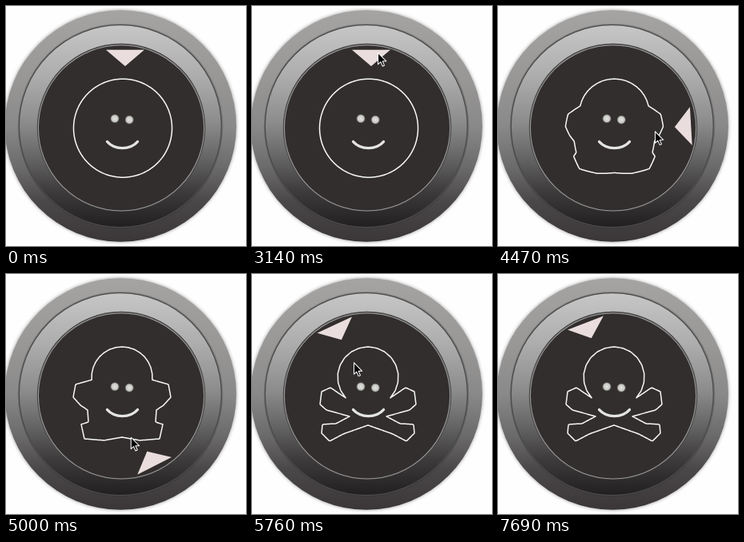
Animation, 300 px wide and 300 px high, one loop 8.35 s. Source, as an HTML page with a canvas:

```html
<!DOCTYPE html>
<html lang="en">
<head>
<meta charset="utf-8">
<title>Morphing dial</title>
<style>
  html, body { margin: 0; width: 100%; height: 100%; overflow: hidden; background: #fefefe; }
  canvas { display: block; width: 300px; height: 300px; }
</style>
</head>
<body>
<canvas id="stage" width="300" height="300"></canvas>
<script>
const ctx = document.getElementById('stage').getContext('2d');
const LOOP = 8350, SAMPLES = 300, RAD = Math.PI / 180;
const CX = 144, CY = 152, AXIS = 145;
const GHOST_TURN = 153, SKULL_TURN = 335;

const lerp = (a, b, u) => a + (b - a) * u;
const clamp = u => Math.max(0, Math.min(1, u));
const easeInOut = u => u * u * (3 - 2 * u);
const easeOut = u => 1 - (1 - u) * (1 - u);
const easeIn = u => u * u;

function polar(angle, radius, x = CX, y = CY) {
  return [x + radius * Math.sin(angle * RAD), y - radius * Math.cos(angle * RAD)];
}

// Moves a list of values through steps of [from, to, ...values].
function follow(values, steps, t, ease) {
  for (const [from, to, ...next] of steps) {
    const u = ease(clamp((t - from) / (to - from)));
    values = values.map((v, k) => lerp(v, next[k], u));
  }
  return values;
}

// Evenly spaced points along a closed outline.
function resample(pts) {
  const closed = [...pts, pts[0]], run = [0];
  for (let i = 1; i < closed.length; i++) {
    const [a, b] = [closed[i - 1], closed[i]];
    run.push(run[i - 1] + Math.hypot(b[0] - a[0], b[1] - a[1]));
  }
  const total = run[run.length - 1];
  let seg = 1;
  return Array.from({ length: SAMPLES }, (_, i) => {
    const d = total * i / SAMPLES;
    while (run[seg] < d) seg++;
    const u = (d - run[seg - 1]) / (run[seg] - run[seg - 1]);
    return [0, 1].map(k => lerp(closed[seg - 1][k], closed[seg][k], u));
  });
}

// A round head down to the neck angle, then a body; the left side mirrors the right.
function figure(neck, body) {
  const half = [];
  for (let i = 0; i <= 8; i++) half.push(polar(neck * i / 8, 38, AXIS, 129));
  body.forEach(([dx, y]) => half.push([AXIS + dx, y]));
  const left = half.slice(1, -1).reverse().map(([x, y]) => [2 * AXIS - x, y]);
  return resample([...half, ...left]);
}

const circle = Array.from({ length: SAMPLES }, (_, i) => polar(360 * i / SAMPLES, 61.5, 146, 152.7));
const ghost = figure(95, [
  [58, 138], [61, 154], [52, 164], [43, 170], [42, 185], [51, 188], [47, 206], [22, 208], [0, 204]
]);
const skull = figure(133, [
  [47, 142], [58, 147], [60, 163], [52, 170], [23, 178], [40, 187],
  [57, 188], [58, 199], [48, 209], [31, 200], [0, 189]
]);

// from, to, dial turn, cursor angle, cursor radius
const DRAG = [
  [3140, 3940, 42.5, 47, 59],
  [4000, 4080, 58.5, 64, 52],
  [4290, 4790, GHOST_TURN, 167, 53],
  [5000, 5760, SKULL_TURN, 338, 45],
  [6780, 6920, 339, 342, 46]
];
const dragAt = t => follow([0, 8, 95], DRAG, t, easeInOut);

function cursorAt(t) {
  if (t < 710 || t >= 7690) return null;
  if (t < 3140) {
    const enter = [[710, 1300, 155, 58], [2070, 2220, 160, 58], [2660, 2750, 157, 57.5]];
    return follow([267, 96], enter, t, easeOut);
  }
  const [, angle, radius] = dragAt(t);
  return follow(polar(angle, radius), [[7070, 7690, 273, 300]], t, easeIn);
}

function poly(points) {
  ctx.beginPath();
  points.forEach(p => ctx.lineTo(p[0], p[1]));
  ctx.closePath();
}

function shade(y0, y1, stops) {
  const g = ctx.createLinearGradient(0, y0, 0, y1);
  stops.forEach(([at, color]) => g.addColorStop(at, color));
  return g;
}

function disc(x, y, r, fill, stroke, width = 1.3) {
  ctx.beginPath();
  ctx.arc(x, y, r, 0, 2 * Math.PI);
  ctx.fillStyle = fill;
  ctx.fill();
  if (stroke) {
    ctx.strokeStyle = stroke;
    ctx.lineWidth = width;
    ctx.stroke();
  }
}

function drawKnob() {
  ctx.fillStyle = '#fefefe';
  ctx.fillRect(0, 0, 300, 300);
  ctx.save();
  ctx.shadowColor = 'rgba(80,80,80,.6)';
  ctx.shadowBlur = 4;
  disc(143.2, 150, 144.7, shade(4, 296, [
    [0, '#a5a4a3'], [.3, '#989796'], [.5, '#8a8989'], [.68, '#6b6a6a'], [.82, '#4b4849'], [1, '#3a3638']
  ]));
  ctx.restore();
  disc(143, 150.2, 128.3, 'rgba(40,40,40,.22)');
  disc(142.8, 150.2, 126.5, shade(24, 277, [
    [0, '#c6c6c6'], [.25, '#adadad'], [.48, '#8c8c8c'], [.65, '#676666'], [.82, '#3d3b3c'], [1, '#211f20']
  ]), '#4c4b4b');
  disc(144, 152, 104.6, '#312e2d', 'rgba(60,59,59,.8)');
  disc(144, 152.4, 103.6, '#312e2d', '#989797', 1.2);
}

function drawMarker(turn) {
  const [x, y] = polar(lerp(2.9, 360, turn / 360), 97.3);
  ctx.save();
  ctx.translate(x, y);
  ctx.rotate(turn * RAD);
  poly([[-24, 0], [24, 0], [0, 20.5]]);
  ctx.fillStyle = '#eaddde';
  ctx.fill();
  ctx.restore();
}

function drawOutline(turn) {
  const late = turn > GHOST_TURN;
  const [a, b] = late ? [ghost, skull] : [circle, ghost];
  const u = late ? clamp((turn - GHOST_TURN) / (SKULL_TURN - GHOST_TURN)) : turn / GHOST_TURN;
  poly(a.map((p, n) => p.map((v, k) => lerp(v, b[n][k], u))));
  ctx.strokeStyle = '#f8f8f8';
  ctx.lineWidth = 1.5;
  ctx.lineJoin = 'round';
  ctx.stroke();
}

function drawEye(x, y) {
  const g = ctx.createRadialGradient(x, y, 1, x, y, 6.3);
  g.addColorStop(0, '#dededa');
  g.addColorStop(.6, '#c4c4c0');
  g.addColorStop(1, 'rgba(49,46,45,0)');
  disc(x, y, 6.3, g);
}

function drawFace() {
  drawEye(136, 140.8);
  drawEye(154.2, 142.2);
  ctx.beginPath();
  ctx.moveTo(126.5, 169.6);
  ctx.bezierCurveTo(136, 180.2, 155, 180.2, 164.5, 169.6);
  ctx.strokeStyle = '#e4e4e2';
  ctx.lineWidth = 3.3;
  ctx.lineCap = 'round';
  ctx.stroke();
}

function drawCursor([x, y]) {
  ctx.save();
  ctx.translate(x + .3, y + .6);
  ctx.scale(.93, .93);
  poly([[0, 0], [0, 15.5], [3.6, 12.2], [6.2, 18], [8.6, 17], [6.1, 11.3], [11, 11.2]]);
  ctx.fillStyle = '#000';
  ctx.fill();
  ctx.strokeStyle = '#fff';
  ctx.lineWidth = 1.1;
  ctx.lineJoin = 'round';
  ctx.stroke();
  ctx.restore();
}

function render(t) {
  const [turn] = dragAt(t);
  drawKnob();
  drawMarker(turn);
  drawOutline(turn);
  drawFace();
  const tip = cursorAt(t);
  if (tip) drawCursor(tip);
}

const start = performance.now();
function tick() {
  render((performance.now() - start) % LOOP);
  requestAnimationFrame(tick);
}
tick();
</script>
</body>
</html>
```
